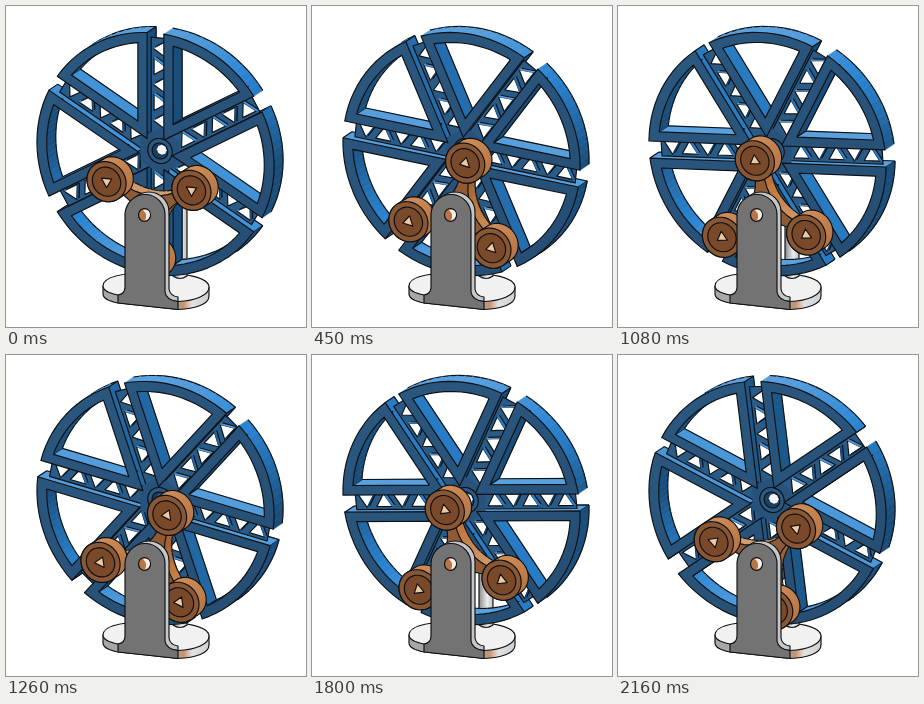
An HTML page for the animation above (2.25 s loop, 300 by 321 pixels).

```html
<!DOCTYPE html>
<html lang="en">
<head>
<meta charset="utf-8">
<title>Three-roller wheel drive</title>
<style>
  html, body { margin: 0; width: 100%; height: 100%; overflow: hidden; background: #fff; }
  svg { display: block; width: 100vw; height: 100vh; }
  .ink { stroke: #0c1014; stroke-width: 1.15; stroke-linejoin: round; }
</style>
</head>
<body>
<svg viewBox="0 0 300 321">
  <defs>
    <linearGradient id="blue" gradientUnits="userSpaceOnUse" x1="60" y1="30" x2="230" y2="260">
      <stop offset="0" stop-color="#2b5880"/><stop offset="1" stop-color="#264e74"/>
    </linearGradient>
    <linearGradient id="slab">
      <stop offset="0" stop-color="#a8a8a8"/><stop offset=".68" stop-color="#a8a09a"/>
      <stop offset=".76" stop-color="#c9936d"/><stop offset=".84" stop-color="#e2e2e2"/><stop offset="1" stop-color="#cfcfcf"/>
    </linearGradient>
    <linearGradient id="post">
      <stop offset="0" stop-color="#8d8d8d"/><stop offset=".6" stop-color="#ededed"/><stop offset="1" stop-color="#bdbdbd"/>
    </linearGradient>
    <linearGradient id="copper" x1="0" y1="0" x2="1" y2="1">
      <stop offset="0" stop-color="#d8965f"/><stop offset="1" stop-color="#b06f40"/>
    </linearGradient>
  </defs>
  <g class="ink">
    <path d="M97 280V288C97 292 102 295 112 297L172 303.500C190 303 203 298 203 290V281z" fill="url(#slab)"/>
    <path d="M97 280C97 270 120 266.500 150 266.500S203 272 203 281C203 289 190 295 172 295.500L112 289C102 287 97 284 97 280z" fill="#f1f1f1"/>
    <path d="M167 160V270q7 5 14 0V160z" fill="url(#post)"/>
  </g>
  <g id="wheel"></g>
  <g id="driver"></g>
  <g class="ink">
    <path d="M123 206a20 20 0 0 1 40 0V283q1 7 9 8v4.500L140 290z" fill="#c6c6c6"/>
    <path d="M119 208a20 20.500 0 0 1 40 2V286q1 8 13 9.500V303.500L112 297V289q7-1 7-8z" fill="#737373"/>
    <ellipse cx="138.500" cy="209" rx="6" ry="6.500" fill="#b87548"/>
    <path d="M137 204q7-1 7 5q-1 5-5 5q3-5-2-10z" fill="#f6eee8" stroke="none"/>
  </g>
</svg>
<script>
const FRAME = 90, COUNT = 25, RAD = Math.PI / 180;
const WHEEL = [149.5, 148], HUB = [143, 205];
const DEPTH = [9, -6], ORBIT = 50;
const BLUE = { hue: '208 66%', dark: 29, gain: 32 };
const ORANGE = { hue: '27 52%', dark: 42, gain: 22 };
const fmt = p => p[0].toFixed(2) + ' ' + p[1].toFixed(2);
const poly = pts => 'M' + pts.map(fmt).join('L') + 'Z';
const push = (p, k) => [p[0] + DEPTH[0] * k, p[1] + DEPTH[1] * k];
const path = (d, fill, extra = 'class="ink"') => `<path d="${d}" fill="${fill}" ${extra}/>`;

// Point at radius r along a clockwise angle from up, shifted sideways by s, in the tilted plane.
function place(origin, deg, r, s = 0) {
  const a = deg * RAD;
  const x = r * Math.sin(a) + s * Math.cos(a), y = r * Math.cos(a) - s * Math.sin(a);
  return [origin[0] + x * 0.98, origin[1] + x * 0.1 - y];
}

function disc(origin, r, n = 36) {
  return poly(Array.from({ length: n }, (_, i) => place(origin, i * 360 / n, r)));
}

// Pie piece between two spokes, its straight sides kept `gap` away from the spoke lines.
function sector(deg, gap, r) {
  const edge = Math.asin(gap / r) / RAD, n = 14, pts = [place(WHEEL, deg + 30, gap * 2)];
  for (let i = 0; i <= n; i++) pts.push(place(WHEEL, deg + edge + (60 - 2 * edge) * i / n, r));
  return pts;
}

// Visible side faces of an extruded outline; side is 1 for solids and -1 for holes.
function walls(pts, side, thick, tint) {
  let out = '';
  pts.forEach((a, i) => {
    const b = pts[(i + 1) % pts.length];
    const dx = b[0] - a[0], dy = b[1] - a[1], len = Math.hypot(dx, dy);
    const nx = side * dy / len, ny = -side * dx / len;
    if (nx * DEPTH[0] + ny * DEPTH[1] <= 0) return;
    const c = push(b, thick), d = push(a, thick);
    const color = `hsl(${tint.hue} ${(tint.dark + tint.gain * Math.max(0, -ny)).toFixed(1)}%)`;
    out += path(poly([a, b, c, d]), color, `stroke="${color}" stroke-width=".6"`);
    const ends = len > 40 ? `M${fmt(a)}L${fmt(d)}M${fmt(b)}L${fmt(c)}` : '';
    out += path(`M${fmt(d)}L${fmt(c)}${ends}`, 'none');
  });
  return out;
}

function truss(deg) {
  const at = (r, s) => push(place(WHEEL, deg, r, s), 0.5);
  let out = path(poly([at(0, -9), at(113, -9), at(113, 9), at(0, 9)]), '#2a5a86');
  for (let i = 0; i < 5; i++) {
    const r = 30 + 18 * i, s = i % 2 ? 1 : -1;
    const hole = [at(r - 8 * s, -6 * s), at(r, 7 * s), at(r + 8 * s, -6 * s)];
    out += path(poly(hole), '#fff') + walls(hole, -1, 0.25, BLUE);
  }
  return out;
}

function drawWheel(turn) {
  let sides = '', bars = '', fronts = '';
  for (let i = 0; i < 6; i++) {
    const deg = turn + i * 60;
    const rim = sector(deg, 8.5, 121), hole = sector(deg, 18, 111);
    sides += walls(rim, 1, 1, BLUE) + walls(hole, -1, 1, BLUE);
    bars += truss(deg);
    fronts += path(poly(rim) + poly(hole), 'url(#blue)', 'class="ink" fill-rule="evenodd"');
  }
  const mid = push(WHEEL, 0.5);
  return sides + bars + path(disc(mid, 23, 6), '#285279', '') + fronts +
    path(disc(mid, 12.5), '#2b5982') + path(disc(mid, 8), '#1b3f60') +
    path(disc(push(mid, 0.2), 5, 8), '#f4f4f4', '');
}

// Three-pointed star with hollow curved sides.
function star(origin, turn) {
  const pts = [], n = 10;
  for (let i = 0; i < 3; i++) {
    const deg = turn + i * 120;
    const a = place(origin, deg, ORBIT, 5), b = place(origin, deg + 120, ORBIT, -5);
    const pull = place(origin, deg + 60, -2);
    for (let j = 0; j <= n; j++) {
      const t = j / n, u = 1 - t;
      pts.push([0, 1].map(k => u * u * a[k] + 2 * u * t * pull[k] + t * t * b[k]));
    }
  }
  return pts;
}

function roller(deg, turn) {
  const front = place(HUB, deg, ORBIT), back = push(front, 0.8);
  const out = [], n = 40;
  for (let i = 0; i < n; i++) {
    const a = i * 360 / n, away = Math.sin(a * RAD) * DEPTH[0] - Math.cos(a * RAD) * DEPTH[1] > 0;
    out.push(place(away ? back : front, a, 20));
  }
  const tip = [0, 120, 240].map(a => place(front, turn + a, 6));
  return path(poly(out), 'url(#copper)') + path(disc(front, 20), '#8a5734') +
    path(disc(front, 14.5), '#79492a') + path(poly(tip), '#f1c79d');
}

function drawDriver(turn) {
  const spots = [0, 120, 240].map(a => turn + a);
  const height = a => place(HUB, a, ORBIT)[1];
  spots.sort((a, b) => height(b) - height(a));
  const arms = star(push(HUB, 0.3), turn);
  return walls(arms, 1, 0.8, ORANGE) + path(poly(arms), '#8f5b37') +
    spots.map(a => roller(a, turn)).join('');
}

const wheel = document.getElementById('wheel'), driver = document.getElementById('driver');
let shown = -1;

function render(now) {
  const step = Math.floor(now / FRAME) % COUNT;
  if (step !== shown) {
    shown = step;
    const turn = step * 360 / COUNT;
    // Rollers run through the wheel's axis, so the wheel turns at half their speed.
    wheel.innerHTML = drawWheel(turn / 2);
    driver.innerHTML = drawDriver(turn - 60);
  }
}

const start = performance.now();
function tick() {
  render(performance.now() - start);
  requestAnimationFrame(tick);
}
tick();
</script>
</body>
</html>
```
